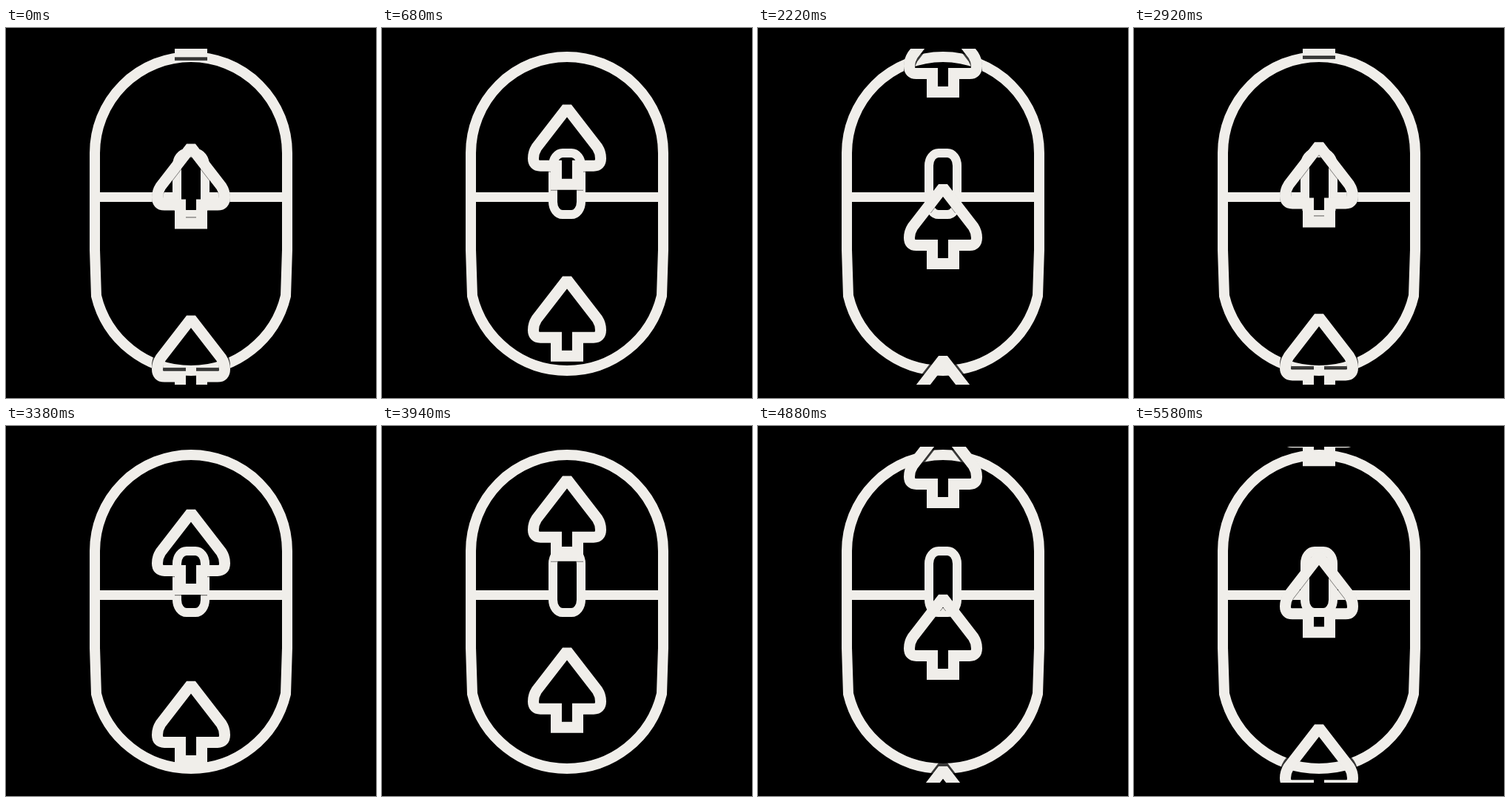
Recreate the animation shown at these times as an HTML page with a canvas. Size 500 px wide and 500 px high, loop 5680 ms.

```html
<!DOCTYPE html>
<html lang="en">
<head>
<meta charset="utf-8">
<title>Rising arrows</title>
<style>
html, body { margin: 0; width: 100%; height: 100%; overflow: hidden; background: #000; }
canvas { display: block; width: 500px; height: 500px; }
</style>
</head>
<body>
<canvas id="stage" width="500" height="500"></canvas>
<script>
const ctx = document.getElementById('stage').getContext('2d');
const COLOR = '#f0eeea';
const LOOP = 5680;
const GAP = 232;      // distance between two arrows
const SPEED = 3.775;  // pixels per step

const ring = new Path2D(
  'M120 169A130 130 0 0 1 380 169V300L378 362A131.6 131.6 0 0 1 122 362L120 300Z');
const bar = new Path2D('M120 228.5H231M269 228.5H380');
const capsule = new Path2D();
capsule.roundRect(231, 169, 38, 83, { x: 13, y: 17 });
// Spade-like arrow, its tip near y = 0
const arrow = new Path2D(
  'M250 6L209 59Q204.5 66 204.5 74Q204.5 84 214 84H235.5V109H264.5V84H286Q295.5 84 295.5 74Q295.5 66 291 59Z');

// Steps last 20, 100 and 20 ms in turn; the last one is held
function stepAt(t) {
  const r = t % 140;
  const n = 3 * Math.floor(t / 140) + (r < 20 ? 0 : r < 120 ? 1 : 2);
  return t >= 5580 ? 119 : Math.min(n, 118);
}

function stroke(path, width, color = COLOR) {
  ctx.lineWidth = width;
  ctx.strokeStyle = color;
  ctx.stroke(path);
}

function clipped(y, height, paint) {
  ctx.save();
  ctx.beginPath();
  ctx.rect(0, y, 500, height);
  ctx.clip();
  paint();
  ctx.restore();
}

function arrows(top, color, shift = 0) {
  for (let k = -2; k <= 1; k++) {
    ctx.save();
    ctx.translate(0, top + k * GAP + shift);
    stroke(arrow, 15, color);
    ctx.restore();
  }
}

// Darkens what is already drawn, on the arrow sides facing the middle
function shade(top, reach, alpha) {
  const dark = `rgba(0,0,0,${alpha})`;
  ctx.globalCompositeOperation = 'source-atop';
  clipped(0, 250, () => arrows(top, dark, reach));
  clipped(250, 250, () => arrows(top, dark, -reach));
  ctx.globalCompositeOperation = 'source-over';
}

function draw(t) {
  const top = 387 - (SPEED * stepAt(t)) % GAP;
  ctx.clearRect(0, 0, 500, 500);
  stroke(ring, 14);
  shade(top, 4.5, 0.75);
  stroke(bar, 13);
  stroke(capsule, 12);
  shade(top, 1.2, 0.5);
  clipped(28, 454, () => arrows(top, COLOR));
}

ctx.miterLimit = 1.5; // square stem corners, blunt tip
const start = performance.now();
function tick() {
  draw((performance.now() - start) % LOOP);
  requestAnimationFrame(tick);
}
tick();
</script>
</body>
</html>
```
